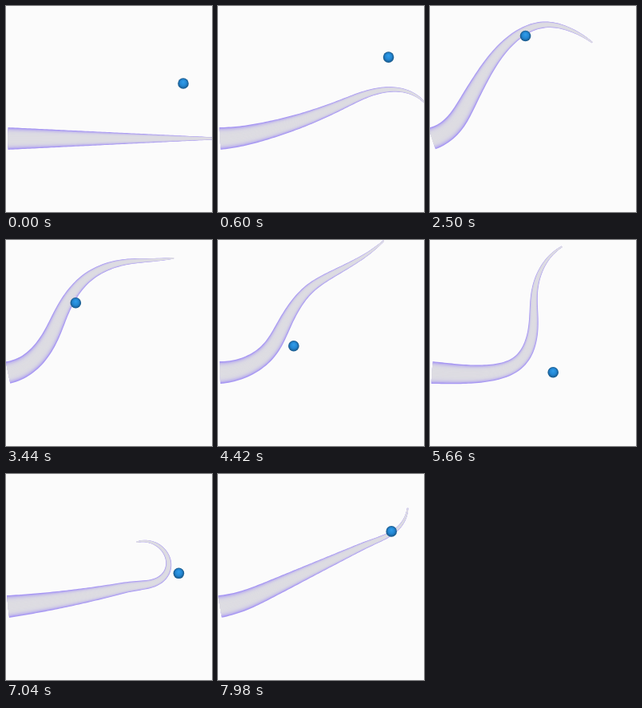
An HTML page with a canvas for the animation above (8000 ms loop, 258 px wide and 258 px high).

```html
<!DOCTYPE html>
<html lang="en">
<head>
<meta charset="utf-8">
<title>Soft arm following a ball</title>
<style>
  html, body { margin: 0; width: 100%; height: 100%; overflow: hidden; background: #fbfbfb; }
  canvas { display: block; width: 100vw; height: 100vh; }
</style>
</head>
<body>
<canvas id="stage"></canvas>
<script>
const SIZE = 258, LOOP = 8000;
const ARM = { x: 2.5, y: 166, length: 273, half: 14, taperEnd: 290, ribs: 90 };
const ORBIT = { x: 153.4, y: 97.1, radius: 68.6, period: 7530 };

// Heading of the arm in degrees at equal steps from base to tip
const POSES = [
  { time: 0, bends: [0, 0, 0, 0, 0, 0, 0] },
  { time: 1260, bends: [8, 27, 35, 42, 40, -4, -86] },
  { time: 2500, bends: [18, 57, 60, 51, 28, -14, -38] },
  { time: 4420, bends: [2, 31, 62, 55, 31, 30, 43] },
  { time: 5660, bends: [-4, 0, 18, 70, 90, 68, 31] },
  { time: 7040, bends: [6, 8, 10, 12, 15, 113, 196] },
  { time: 7980, bends: [9, 23, 25, 25, 25, 27, 84] }
];
const TIMES = POSES.map(pose => pose.time);
const STEPS = POSES[0].bends.map((_, i) => i);

const canvas = document.getElementById("stage");
const ctx = canvas.getContext("2d");
canvas.width = canvas.height = Math.round(SIZE * Math.max(1, devicePixelRatio));
ctx.scale(canvas.width / SIZE, canvas.width / SIZE);

const lerp = (a, b, k) => a + (b - a) * k;

// Smooth curve through the points (xs, ys), read at x
function spline(xs, ys, x) {
  const last = xs.length - 1;
  let i = 0;
  while (i < last - 1 && x >= xs[i + 1]) i++;
  const span = xs[i + 1] - xs[i];
  const slope = j => {
    const a = Math.max(0, j - 1), b = Math.min(last, j + 1);
    return span * (ys[b] - ys[a]) / (xs[b] - xs[a]);
  };
  const k = Math.min(1, (x - xs[i]) / span), k2 = k * k, k3 = k2 * k;
  return lerp(ys[i], ys[i + 1], 3 * k2 - 2 * k3)
    + (k3 - 2 * k2 + k) * slope(i) + (k3 - k2) * slope(i + 1);
}

function drawArm(time) {
  const bends = STEPS.map(i => spline(TIMES, POSES.map(pose => pose.bends[i]), time));
  const heading = u => -spline(STEPS, bends, u * (STEPS.length - 1)) * Math.PI / 180;
  const step = ARM.length / ARM.ribs, ribs = [];
  let { x, y } = ARM;
  for (let i = 0; i <= ARM.ribs; i++) {
    const angle = heading(i / ARM.ribs), next = heading((i + 0.5) / ARM.ribs);
    const half = ARM.half * (1 - i * step / ARM.taperEnd);
    ribs.push([x, y, -Math.sin(angle) * half, Math.cos(angle) * half]);
    x += Math.cos(next) * step;
    y += Math.sin(next) * step;
  }
  const back = [...ribs].reverse();
  for (let layer = 10; layer > 0; layer--) {
    const width = layer / 10, tint = width ** 5;
    ctx.fillStyle = `rgb(${lerp(221, 166, tint)}, ${lerp(220, 150, tint)}, ${lerp(226, 243, tint)})`;
    ctx.beginPath();
    for (const [cx, cy, nx, ny] of ribs) ctx.lineTo(cx + nx * width, cy + ny * width);
    for (const [cx, cy, nx, ny] of back) ctx.lineTo(cx - nx * width, cy - ny * width);
    ctx.fill();
  }
}

function drawBall(time) {
  const angle = 2 * Math.PI * time / ORBIT.period;
  const x = ORBIT.x + ORBIT.radius * Math.cos(angle);
  const y = ORBIT.y - ORBIT.radius * Math.sin(angle);
  const shade = ctx.createRadialGradient(x, y - 2, 0.5, x, y, 6.8);
  shade.addColorStop(0, "#2f9be8");
  shade.addColorStop(0.55, "#2386d2");
  shade.addColorStop(1, "#175585");
  ctx.fillStyle = shade;
  ctx.beginPath();
  ctx.arc(x, y, 6.8, 0, 2 * Math.PI);
  ctx.fill();
}

const start = performance.now();
function tick() {
  const time = (performance.now() - start) % LOOP;
  ctx.fillStyle = "#fbfbfb";
  ctx.fillRect(0, 0, SIZE, SIZE);
  drawArm(time);
  drawBall(time);
  requestAnimationFrame(tick);
}
tick();
</script>
</body>
</html>
```
